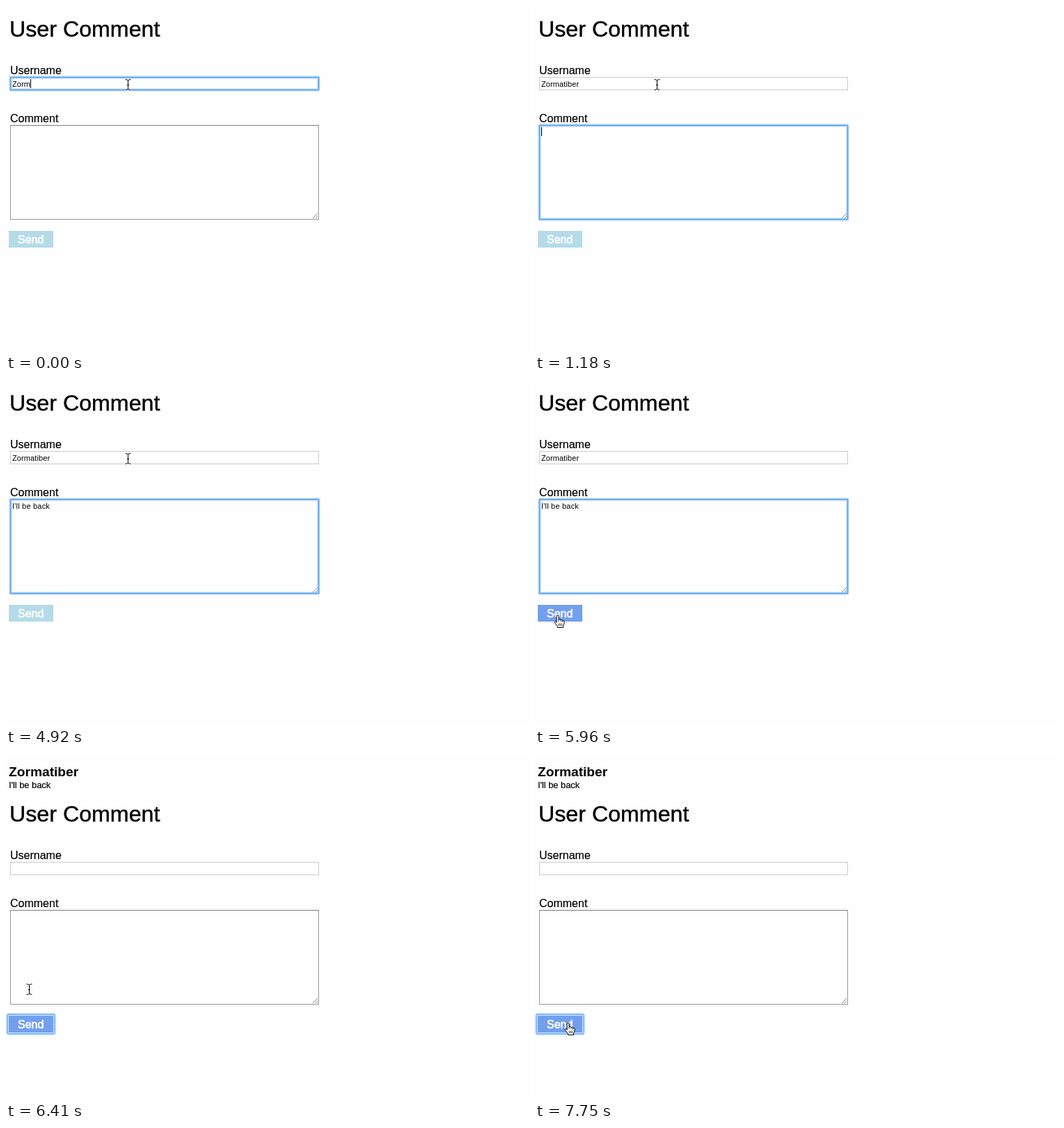
An HTML page for the animation above (8 s loop, 752x497 px).

```html
<!DOCTYPE html>
<html lang="en">
<head>
<meta charset="utf-8">
<title>User Comment</title>
<style>
  html, body { margin: 0; width: 100%; height: 100%; overflow: hidden; background: #fefefe; }
  svg { display: block; width: 752px; height: 497px; font: 16px "Liberation Sans", Arial, sans-serif; }
  text { white-space: pre; stroke: #000; stroke-width: .2; }
  .title { font-size: 32.2px; stroke-width: .4; }
  .typed { font-size: 11px; letter-spacing: .1px; stroke: none; }
  #comment { letter-spacing: .2px; }
  .name { font-size: 19.2px; font-weight: bold; stroke: none; }
  .post { font-size: 12.8px; }
  .box { fill: #fefefe; stroke: #cbcbcb; }
  .area { stroke: #979797; }
  .ring { fill: none; stroke: #5d9fe8; }
  .ring .near { stroke: #69adf5; stroke-width: 3; opacity: .5; }
  .ring .far { stroke: #7db9f7; stroke-width: 5; opacity: .3; }
  .button { opacity: .9; fill: lightblue; }
  .button.hover { fill: cornflowerblue; }
  .send { fill: #fff; stroke: #fff; stroke-width: .6; }
  .cursor { stroke-linejoin: round; stroke-linecap: round; }
  .halo { stroke: #fff; stroke-width: 2.6; opacity: .8; }
</style>
</head>
<body>
<svg viewBox="0 0 752 497">
  <g id="posted">
    <text class="name" x="4" y="32">Zormatiber</text>
    <text class="post" x="4" y="49">I'll be back</text>
  </g>

  <g id="form">
    <text class="title" x="5" y="44">User Comment</text>

    <text x="6" y="98">Username</text>
    <rect class="box" x="6.5" y="102.5" width="443" height="18"/>
    <g class="ring" id="nameRing">
      <rect class="far" x="6.5" y="102.5" width="443" height="18" rx="1"/>
      <rect class="near" x="6.5" y="102.5" width="443" height="18" rx="1"/>
      <rect x="6.5" y="102.5" width="443" height="18"/>
    </g>
    <text class="typed" id="name" x="9" y="116"></text>

    <text x="6" y="167">Comment</text>
    <rect class="box area" x="6.5" y="171.5" width="443" height="135"/>
    <path d="M6 171.5H450" stroke="#7d7d7d"/>
    <path d="M441 305L448 298M445 305L448 302" stroke="#777" stroke-width=".9"/>
    <g class="ring" id="areaRing">
      <rect class="far" x="6.5" y="171.5" width="443" height="135" rx="1"/>
      <rect class="near" x="6.5" y="171.5" width="443" height="135" rx="1"/>
      <rect x="6.5" y="171.5" width="443" height="135"/>
    </g>
    <text class="typed" id="comment" x="9" y="185"></text>

    <rect id="caret" width="1" height="13"/>

    <g id="buttonRing" fill="none">
      <rect x="2.5" y="321.5" width="67" height="27" rx="1.5" stroke="#8ec4f8" stroke-width="4.4" opacity=".6"/>
      <rect x="2.5" y="321.5" width="67" height="27" rx="1.5" stroke="#7ab8f5" stroke-width="2.4"/>
      <rect x="3.5" y="322.5" width="65" height="25" stroke="#d3e8fc"/>
    </g>
    <rect class="button" id="button" x="4" y="323" width="64" height="24"/>
    <text class="send" x="17" y="341">Send</text>
  </g>

  <g class="cursor" id="beam" fill="none">
    <path class="halo" d="M-3.5 -7.5Q0 -7.5 0 -5.5Q0 -7.5 3.5 -7.5M0 -6V6M-3.5 7.5Q0 7.5 0 5.5Q0 7.5 3.5 7.5"/>
    <path stroke="#000" d="M-3.5 -7.5Q0 -7.5 0 -5.5Q0 -7.5 3.5 -7.5M0 -6V6M-3.5 7.5Q0 7.5 0 5.5Q0 7.5 3.5 7.5M-1 .5H1"/>
  </g>
  <g class="cursor" id="hand" fill="#fff" stroke="#000">
    <path d="M-2 1.5Q-2 0 -.5 0Q1 0 1 1.5V6Q3 5 4 6.5Q6 6 6.5 7.5Q9 7 9 9V12L7.5 15V17.5H-.5V16L-4 11.5Q-5.5 9 -4 8.5Q-3 8.3 -2 10Z"/>
    <path fill="none" stroke-width=".8" d="M1 6V8.5M4 6.5V9M6.5 7.5V9.5M1.3 12V15M3.4 12V15M5.5 12V15"/>
  </g>
  <path class="cursor" id="arrow" stroke="#fff" d="M0 0V13.5L3.2 10.6L5.3 15.5L7.4 14.6L5.4 9.9H9.7Z"/>
</svg>

<script>
const LOOP = 8000, TICK = 149, LEAD = 16;

// Moments of the story, counted in ticks.
const FOCUS = 8, FIRST_KEY = 14, SECOND_KEY = 18, LEAVE = 33, ARRIVE = 37,
  PRESS = 42, SUBMIT = 43, RETURN = 52;
const NAME = "Zormatiber", COMMENT = "I'll be back", SHIFT = 53;
const FIELD = [175, 113], BUTTON = [33, 338], REST = [48, 386];
const LOOP_OUT = [100, 0], LOOP_BACK = [330, 480];

const $ = id => document.getElementById(id);
const show = (id, on) => $(id).setAttribute("visibility", on ? "visible" : "hidden");
const move = (id, x, y) => $(id).setAttribute("transform", `translate(${x} ${y})`);
const inside = (v, low, high) => v >= low && v < high;
const progress = (n, from, to) => Math.min(1, Math.max(0, (n - from) / (to - from)));
const mix = (a, b, p) => a.map((v, i) => v + (b[i] - v) * p);

// De Casteljau: blend neighbours until one point is left.
const bezier = (points, p) => points.length === 1 ? points[0]
  : bezier(points.slice(1).map((b, i) => mix(points[i], b, p)), p);

const nameLength = n => Math.min(NAME.length, 4 + n);

// Two hesitant keys, then two ticks of typing and one of rest.
function commentLength(n) {
  const hesitant = (n >= FIRST_KEY) + (n >= SECOND_KEY);
  const fluent = n - SECOND_KEY + 1 - (n % 3 === 2);
  return Math.min(COMMENT.length, Math.max(hesitant, fluent));
}

// Lit at each key, then blinking every three ticks.
function caretLit(n) {
  if (n < FOCUS) return true;
  let idle = 0;
  while (n - idle > FOCUS && commentLength(n - idle - 1) === commentLength(n)) idle++;
  return idle % 6 < 3;
}

function pointerAt(n) {
  if (n < SUBMIT) return mix(FIELD, BUTTON, progress(n, LEAVE, ARRIVE));
  const eased = 1 - (1 - progress(n, SUBMIT, RETURN)) ** 3;
  return bezier([BUTTON, LOOP_OUT, LOOP_BACK, REST], eased);
}

function cursorKind(x, y) {
  if (inside(x, 4, 68) && inside(y, 323, 347)) return "hand";
  const overField = inside(y, 102, 121) || inside(y, 171, 307);
  return overField && inside(x, 6, 450) ? "beam" : "arrow";
}

function draw(n) {
  const submitted = n >= SUBMIT, inArea = n >= FOCUS;
  const shift = submitted ? SHIFT : 0;
  const [x, y] = pointerAt(n).map(Math.round);
  const kind = cursorKind(x, y - shift);

  show("posted", submitted);
  move("form", 0, shift);
  $("name").textContent = submitted ? "" : NAME.slice(0, nameLength(n));
  $("comment").textContent = submitted ? "" : COMMENT.slice(0, commentLength(n));

  show("nameRing", !inArea);
  show("areaRing", inArea && n < PRESS);
  show("buttonRing", n >= PRESS);

  const field = $(inArea ? "comment" : "name");
  const width = field.textContent ? field.getComputedTextLength() : 0;
  move("caret", 9 + Math.round(width), inArea ? 174 : 105);
  show("caret", n < PRESS && caretLit(n));

  // The button keeps its hover look until the pointer next moves.
  $("button").classList.toggle("hover", kind === "hand" || n === SUBMIT);

  for (const id of ["beam", "hand", "arrow"]) {
    show(id, id === kind);
    move(id, id === "beam" ? x + .5 : x, y);
  }
}

function frame() {
  draw(Math.floor((performance.now() % LOOP + LEAD) / TICK));
  requestAnimationFrame(frame);
}
frame();
</script>
</body>
</html>
```
